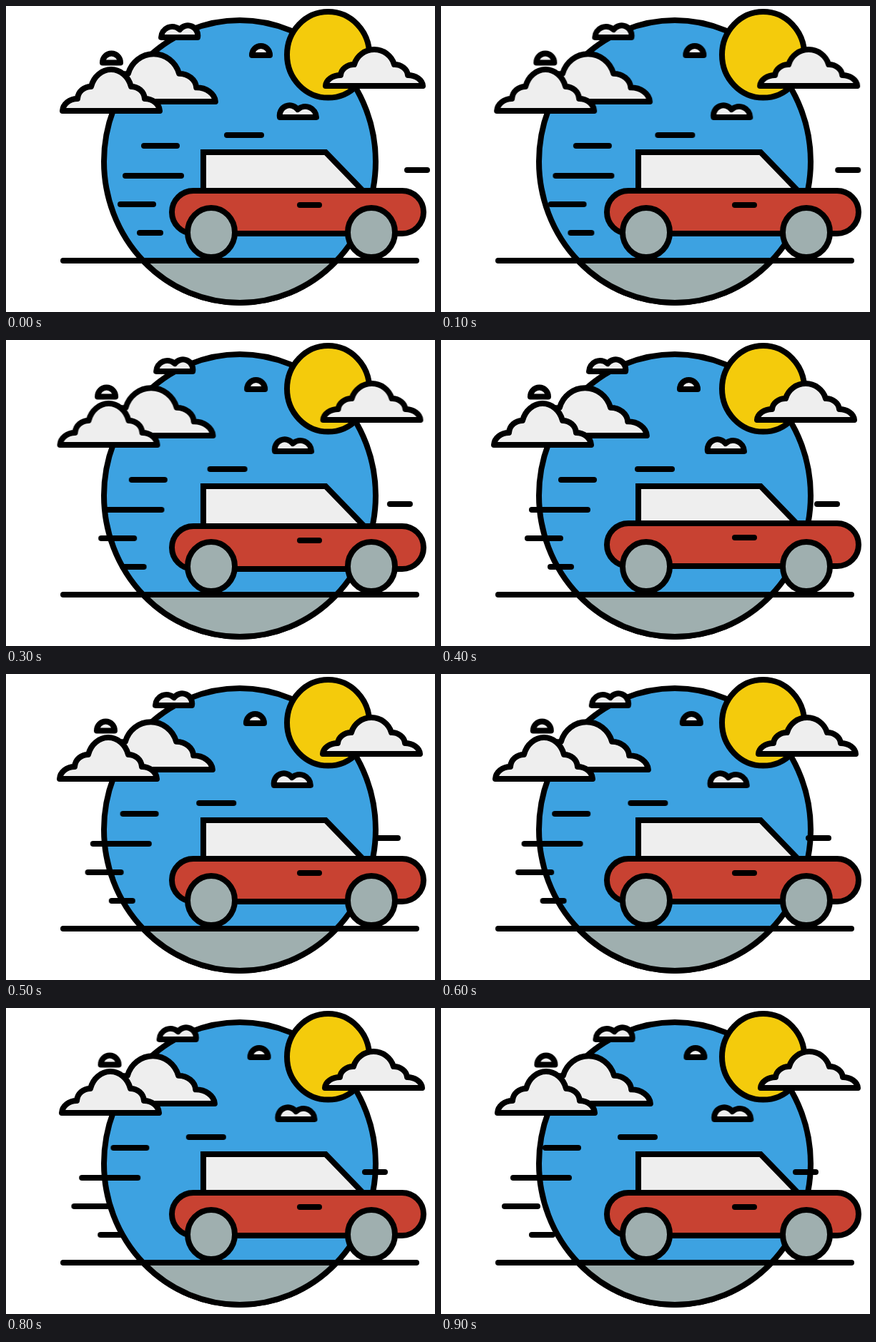
Recreate the animation shown at these times as an HTML page. Size 600x429 px, loop 1 s.

```html
<!DOCTYPE html>
<html lang="en">
<head>
<meta charset="utf-8">
<title>Car on the road</title>
<style>
  html, body { margin: 0; width: 100%; height: 100%; overflow: hidden; background: #fff; }
  svg { display: block; width: 100%; height: 100%; }
  .ink { stroke: #000; stroke-width: 8; stroke-linecap: round; stroke-linejoin: round; }
  .cloud { fill: #eee; }
  .sharp { stroke-linejoin: miter; }
  #big { vector-effect: non-scaling-stroke; }
</style>
</head>
<body>
<svg viewBox="0 0 600 429" class="ink" fill="none">
  <defs>
    <clipPath id="below"><rect y="357" width="600" height="72"/></clipPath>
    <path id="big" d="M-68 0a21 16 0 0 1 21-15a19 16 0 0 1 19-15a29.2 29.2 0 0 1 56 0a19 16 0 0 1 19 15a21 16 0 0 1 21 15z"/>
    <path id="twin" d="M383 156a14 14 0 0 1 25-11a15.5 15.5 0 0 1 26 11z"/>
    <path id="puff" d="M-12.5 0a12.5 13 0 0 1 25 0z"/>
  </defs>

  <ellipse cx="327" cy="218" rx="190" ry="198" fill="#3da2e1"/>
  <ellipse cx="327" cy="218" rx="190" ry="198" fill="#9fafaf" clip-path="url(#below)"/>
  <ellipse cx="450.6" cy="68.3" rx="57.6" ry="60.3" fill="#f4cb0c"/>

  <g id="near" class="cloud">
    <use href="#big" transform="translate(206.5 134) scale(1.27 1.31)"/>
    <use href="#big" transform="translate(147 147) scale(1 1.137)"/>
    <use href="#big" transform="translate(515 112)"/>
  </g>

  <g id="far" class="cloud">
    <use href="#twin"/>
    <use href="#twin" transform="matrix(-1 0 0 1 651 -112)"/>
    <use href="#puff" x="147.5" y="79.5"/>
    <use href="#puff" x="356.5" y="69"/>
  </g>

  <g id="wind"></g>

  <path class="sharp" d="M276 262V205H447L502 262Z" fill="#eee"/>
  <g id="body">
    <path d="M262 259H554A30 30 0 0 1 554 319H262A30 30 0 0 1 262 259Z" fill="#c84232"/>
    <path d="M411 279H438"/>
  </g>
  <g fill="#9fafaf">
    <ellipse cx="287" cy="317.5" rx="33" ry="34.5"/>
    <ellipse cx="511" cy="317.5" rx="33" ry="34.5"/>
  </g>
  <path d="M80 357H574"/>
</svg>

<script>
  const STEPS = 10, STEP_MS = 100, TURN = 4;
  const $ = id => document.getElementById(id);

  // Hold the offset given by rule(step) for the length of each step.
  function hop(el, rule, axis = 'X') {
    const frames = Array.from({ length: STEPS + 1 }, (_, i) => ({
      transform: `translate${axis}(${rule(Math.min(i, STEPS - 1))}px)`,
      easing: 'steps(1, end)'
    }));
    el.animate(frames, { duration: STEPS * STEP_MS, iterations: Infinity });
  }

  // Speed up towards `turn`, then move evenly on to `end`.
  const drift = (turn, end) => i => i <= TURN
    ? turn * (i / TURN) ** 1.3
    : turn + (end - turn) * (i - TURN) / (STEPS - 1 - TURN);

  const streaks = [
    { y: 181, x: 309, len: 48, turn: -34, end: -58 },
    { y: 196, x: 193, len: 46, turn: -25, end: -47 },
    { y: 238, x: 167, len: 78, turn: -40, end: -66 },
    { y: 278, x: 160, len: 46, turn: -39, end: -71 },
    { y: 318, x: 187, len: 29, turn: -34, end: -60 },
    { y: 230, x: 561, len: 28, turn: -35, end: -65 }
  ];

  for (const { y, x, len, turn, end } of streaks) {
    const line = document.createElementNS('http://www.w3.org/2000/svg', 'path');
    line.setAttribute('d', `M${x} ${y}h${len}`);
    $('wind').append(line);
    hop(line, drift(turn, end));
  }

  hop($('near'), drift(-5, 0));
  hop($('far'), drift(-10, -0.6));

  // One jolt: down just before the turn, up on it.
  hop($('body'), i => i === TURN - 1 ? 2 : i === TURN ? -2 : 0, 'Y');
</script>
</body>
</html>
```
